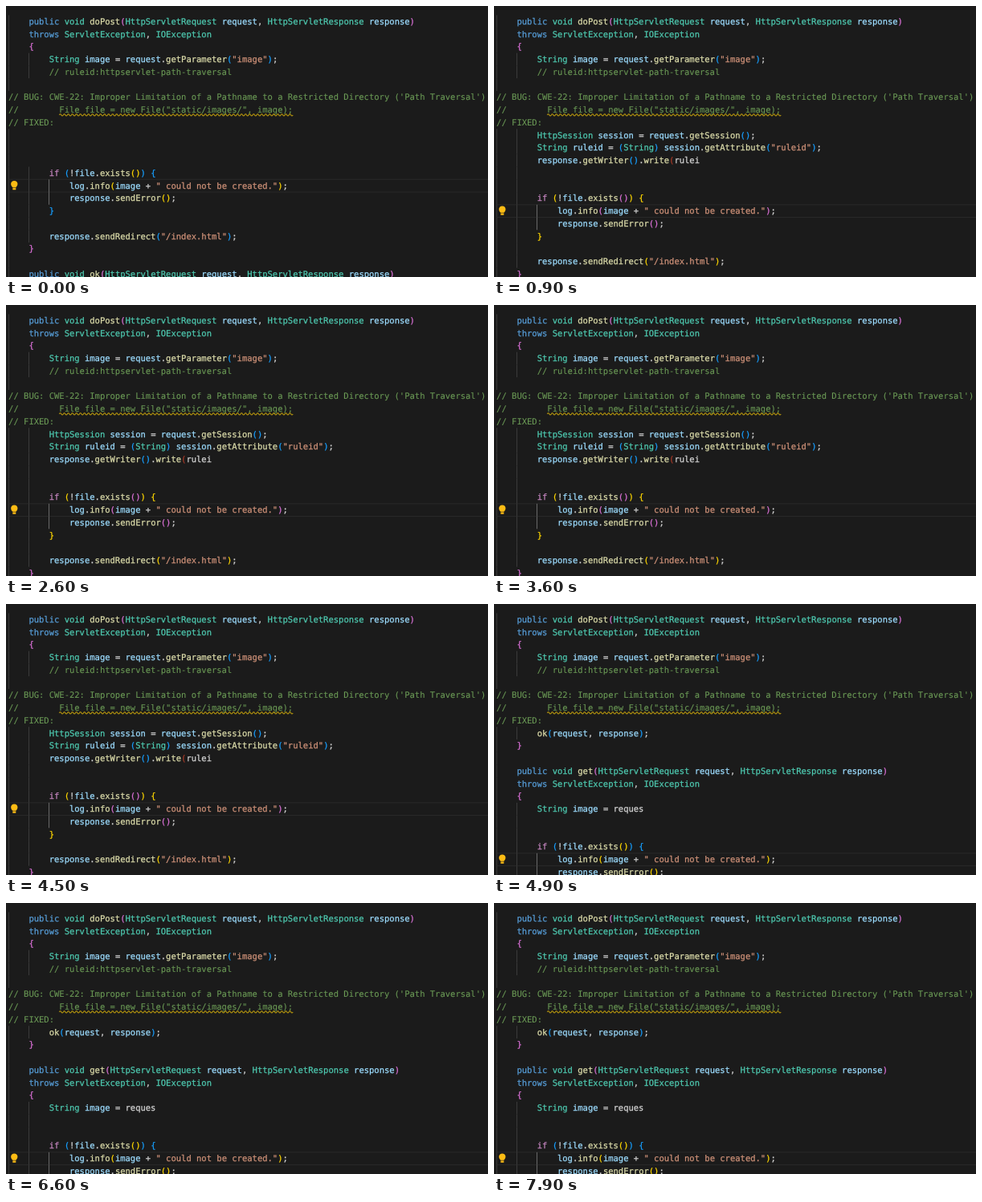
An HTML page for the animation above (8 s loop, 600 by 338 pixels).

```html
<!DOCTYPE html>
<html lang="en">
<head>
<meta charset="utf-8">
<title>Code editor</title>
<style>
  html, body { margin: 0; width: 100%; height: 100%; overflow: hidden; background: #1b1b1b; }
  svg { display: block; width: 600px; height: 338px; }
  text {
    font: 10.5px "DejaVu Sans Mono", "Liberation Mono", monospace;
    text-rendering: geometricPrecision;
    white-space: pre;
    color: #d4d4d4;
  }
  tspan { fill: currentColor; stroke: currentColor; stroke-width: 0.25px; }
  .keyword { color: #569cd6; }
  .control { color: #c586c0; }
  .type { color: #4ec9b0; }
  .call { color: #dcdcaa; }
  .name { color: #9cdcfe; }
  .string { color: #ce9178; }
  .comment { color: #6a9955; stroke-width: 0.1px; }
  .b0 { color: #ffd700; }
  .b1 { color: #da70d6; }
  .b2 { color: #179fff; }
  .open { color: #a83a28; }
  .guide { stroke: #3a3a3a; }
  .guide.active { stroke: #686868; }
  .row { fill: none; stroke: #292929; }
  .squiggle { fill: none; stroke: #bd9b0c; stroke-width: 1.1; }
  .bulb { fill: #fdbc14; }
  .scene { visibility: hidden; animation: 8s step-end infinite; }
  .before { animation-name: before; }
  .first { animation-name: first; }
  .second { animation-name: second; }
  @keyframes before { 0% { visibility: visible } 6.25%, 100% { visibility: hidden } }
  @keyframes first { 0% { visibility: hidden } 6.25% { visibility: visible } 58.75%, 100% { visibility: hidden } }
  @keyframes second { 0% { visibility: hidden } 58.75%, 100% { visibility: visible } }
</style>
</head>
<body>
<svg id="stage" viewBox="0 0 600 338"></svg>
<script>
const LEFT = 3.1, TOP = 11.4, PITCH = 15.76, BASE = 11.4, CHAR = 6.323;
const stage = document.getElementById("stage");

const head = `    public void doPost(HttpServletRequest request, HttpServletResponse response)
    throws ServletException, IOException
    {
        String image = request.getParameter("image");
        // ruleid:httpservlet-path-traversal

// BUG: CWE-22: Improper Limitation of a Pathname to a Restricted Directory ('Path Traversal')
//        File file = new File("static/images/", image);
// FIXED:
`;

const tail = `        if (!file.exists()) {
            log.info(image + " could not be created.");
            response.sendError();
        }

        response.sendRedirect("/index.html");
    }

    public void ok(HttpServletRequest request, HttpServletResponse response)`;

const scenes = {
  before: "\n\n\n",
  first: `        HttpSession session = request.getSession();
        String ruleid = (String) session.getAttribute("ruleid");
        response.getWriter().write(rulei


`,
  second: `        ok(request, response);
    }

    public void get(HttpServletRequest request, HttpServletResponse response)
    throws ServletException, IOException
    {
        String image = reques


`
};

const xAt = col => LEFT + col * CHAR;
const yAt = row => TOP + row * PITCH;

function add(parent, tag, attrs, content) {
  const el = document.createElementNS("http://www.w3.org/2000/svg", tag);
  for (const key in attrs) el.setAttribute(key, attrs[key]);
  if (content) el.textContent = content;
  return parent.appendChild(el);
}

function wordClass(word, rest) {
  if (word === "if") return "control";
  if (/^(public|throws|new)$/.test(word)) return "keyword";
  if (word === "void" || /^[A-Z]/.test(word)) return "type";
  if (rest[0] === "(") return "call";
  return /^(rulei|reques)$/.test(word) ? "plain" : "name";
}

// Bracket colours cycle with nesting depth; the class body is depth 1.
function drawCode(parent, lines) {
  let depth = 1;
  lines.forEach((line, row) => {
    const text = add(parent, "text", { y: yAt(row) + BASE });
    for (const m of line.matchAll(/\/\/.*|"[^"]*"|\w+|[^\s\w]/g)) {
      const part = m[0], rest = line.slice(m.index + part.length);
      let kind = "plain";
      if (part.startsWith("//")) kind = "comment";
      else if (part[0] === '"') kind = "string";
      else if (/\w/.test(part)) kind = wordClass(part, rest);
      else if (/[({]/.test(part)) {
        kind = rest === "rulei" ? "open" : "b" + depth % 3;
        depth++;
      } else if (/[)}]/.test(part)) {
        if (m.index === 4) depth = 2;
        kind = "b" + --depth % 3;
      }
      add(text, "tspan", { x: xAt(m.index), class: kind }, part);
    }
  });
}

function guideLevel(lines, row) {
  const level = line => line.search(/\S/) / 4 | 0;
  if (lines[row]) return level(lines[row]);
  const above = level(lines.slice(0, row).reverse().find(Boolean));
  const below = level(lines.slice(row).find(Boolean));
  return above === below ? above : 1 + Math.min(above, below);
}

function drawGuides(parent, lines) {
  lines.forEach((line, row) => {
    for (let i = 0; i < guideLevel(lines, row); i++) {
      const x = Math.floor(xAt(i * 4)) + 0.5;
      add(parent, "line", {
        class: i === 2 ? "guide active" : "guide",
        x1: x, x2: x, y1: yAt(row), y2: yAt(row + 1)
      });
    }
  });
}

function drawCursorRow(parent, row) {
  const y = yAt(row), mid = y + PITCH / 2 - 0.5;
  add(parent, "path", { class: "row", d: `M3 ${y}H600M3 ${y + PITCH}H600` });
  add(parent, "path", {
    class: "bulb",
    d: `M8.3 ${mid + 2.6}C5 ${mid} 5.4 ${mid - 5.6} 10.3 ${mid - 5.6}S15.6 ${mid} 12.3 ${mid + 2.6}V${mid + 5.5}H8.3Z`
  });
  add(parent, "path", { d: `M8 ${mid + 3}H12.6`, stroke: "#1b1b1b", "stroke-width": 0.6 });
}

function drawSquiggle(parent, row, col, length) {
  const waves = Math.round(length * CHAR / 5);
  const half = length * CHAR / waves / 2;
  add(parent, "path", {
    class: "squiggle",
    d: `M${xAt(col)} ${yAt(row) + 14.2}` + `q${half / 2} -2.2 ${half} 0t${half} 0`.repeat(waves)
  });
}

for (const name in scenes) {
  const lines = (head + scenes[name] + tail).split("\n").slice(0, 21);
  const group = add(stage, "g", { class: "scene " + name });
  drawCursorRow(group, lines.findIndex(line => line.includes("log.info")));
  drawGuides(group, lines);
  drawCode(group, lines);
  drawSquiggle(group, 7, 10, 46);
}
</script>
</body>
</html>
```
